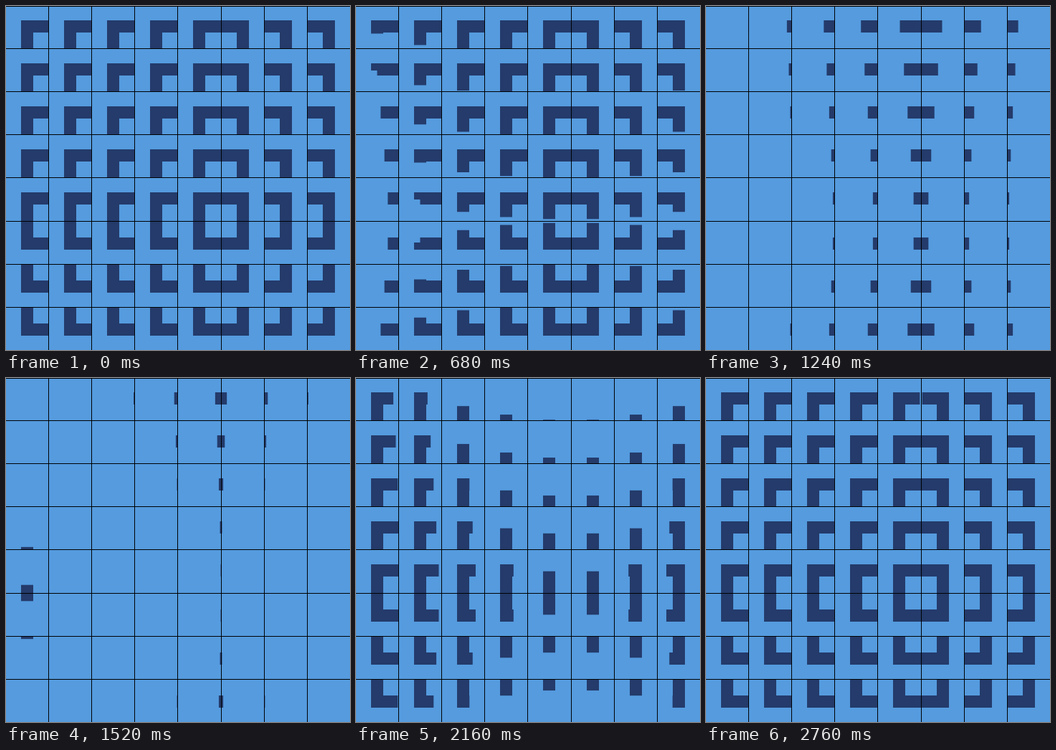
Write an HTML page with a canvas that moves like this. It is 480x480 px and loops after 2800 ms.

```html
<!DOCTYPE html>
<html lang="en">
<head>
<meta charset="utf-8">
<title>Pipe grid</title>
<style>
  html, body { margin: 0; height: 100%; overflow: hidden; background: #559bde; }
  canvas { display: block; width: 480px; height: 480px; }
</style>
</head>
<body>
<canvas id="stage" width="480" height="480"></canvas>
<script>
const ctx = document.getElementById('stage').getContext('2d');
const LOOP = 2800, HOLD = 200, STEP = 40;
const SIZE = 480, CELL = 60, COUNT = 8;
const MID_X = 29.5, MID_Y = 28.5, WIDTH = 17;
const CORNER = CELL - MID_Y, FULL = CORNER + CELL - MID_X;

const progress = (t, start, end) => Math.min(1, Math.max(0, (t - start) / (end - start)));
const easeIn = (u, power) => u ** power;
const easeOut = (u, power) => 1 - (1 - u) ** power;
const mix = (a, b, u) => a + (b - a) * u;

// Both ends speed up along the upright and slow down along the arm.
function tailAt(t) {
  return t < 510
    ? mix(0, CORNER, easeIn(progress(t, 0, 510), 2.6))
    : mix(CORNER, FULL, easeOut(progress(t, 510, 1110), 2));
}

function headAt(t) {
  return t < 1690
    ? mix(0, CORNER, progress(t, 1425, 1690))
    : mix(CORNER + WIDTH / 2 - 2, FULL, easeOut(progress(t, 1690, 2090), 1.3));
}

// The wave runs linearly over the rows and quadratically over the columns.
function delay(col, row) {
  const dx = col < 5 ? 5 - col : col - 4;
  const dy = row < 5 ? 4 - row : row - 5;
  return 60 * dy + 20 * (25 - dx * dx);
}

function drawPipe(col, row, from, to) {
  if (to - from < 0.05) return;
  ctx.save();
  ctx.translate((col + 0.5) * CELL, (row + 0.5) * CELL);
  ctx.scale(col < 5 ? 1 : -1, row < 5 ? 1 : -1);
  ctx.translate(-CELL / 2, -CELL / 2);
  ctx.setLineDash([to - from, 999]);
  ctx.lineDashOffset = -from;
  ctx.beginPath();
  ctx.moveTo(MID_X, CELL);
  ctx.lineTo(MID_X, MID_Y);
  ctx.lineTo(CELL, MID_Y);
  ctx.stroke();
  ctx.restore();
}

function drawGrid() {
  ctx.fillStyle = '#000';
  ctx.fillRect(0, 0, SIZE, 1);
  for (let i = 1; i < COUNT; i++) {
    const p = i * CELL - (i < 5 ? 1 : 0);
    ctx.fillRect(p, 0, 1, SIZE);
    ctx.fillRect(0, p, SIZE, 1);
  }
}

function draw(t) {
  ctx.fillStyle = '#559bde';
  ctx.fillRect(0, 0, SIZE, SIZE);
  ctx.strokeStyle = '#243b6b';
  ctx.lineWidth = WIDTH;
  for (let row = 0; row < COUNT; row++) {
    for (let col = 0; col < COUNT; col++) {
      const local = t < HOLD ? 0 : t - delay(col, row);
      if (local < 1300) drawPipe(col, row, tailAt(local), FULL);
      else drawPipe(col, row, 0, headAt(local));
    }
  }
  drawGrid();
}

function tick() {
  const t = performance.now() % LOOP;
  draw(Math.floor(t / STEP) * STEP);
  requestAnimationFrame(tick);
}
tick();
</script>
</body>
</html>
```
